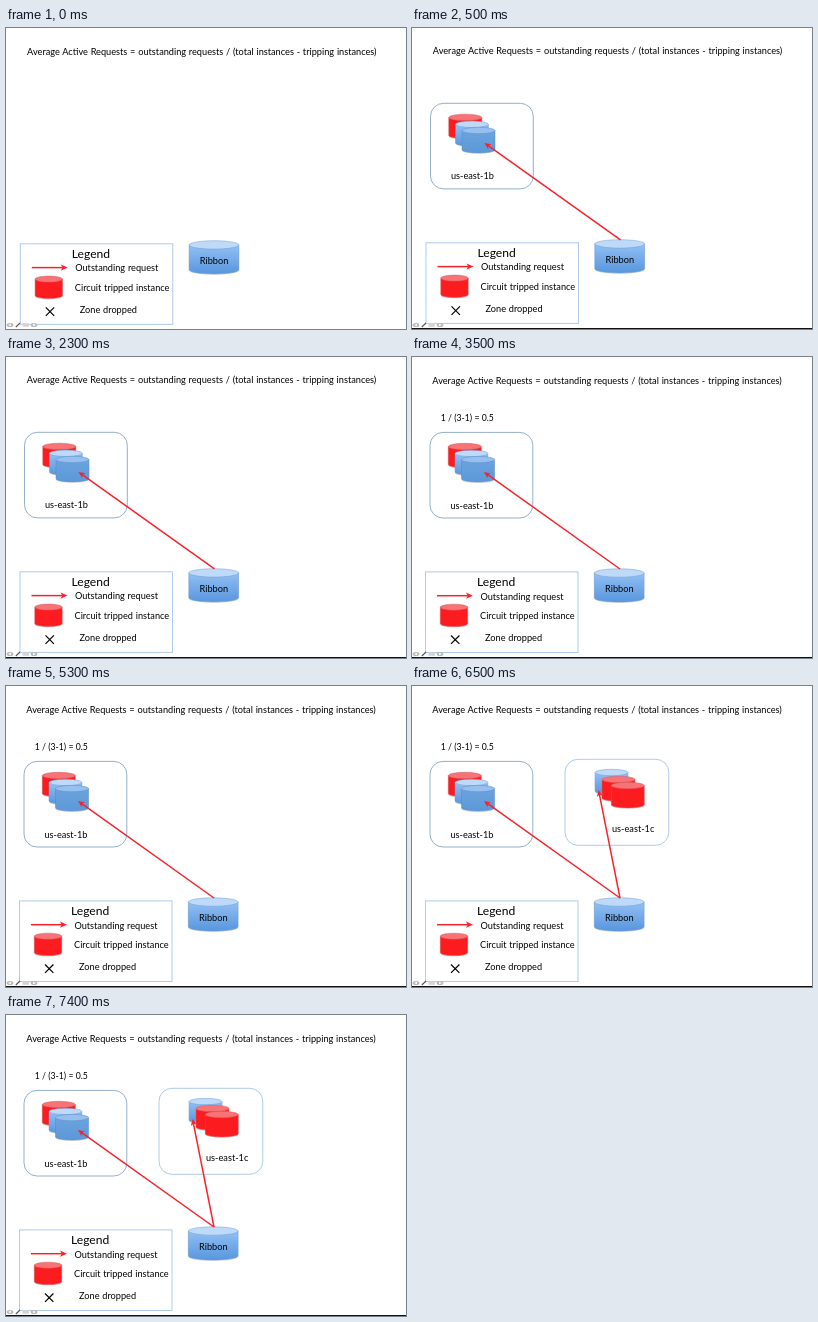
These frames come from a looping animation (400 px wide and 301 px high, 8 s). An HTML page:

```html
<!DOCTYPE html>
<html lang="en">
<head>
<meta charset="utf-8">
<title>Average active requests</title>
<style>
  html, body { margin: 0; width: 100%; height: 100%; overflow: hidden; background: #fff; }
  svg { display: block; width: 400px; height: 301px; }
  text { font-family: Lato, sans-serif; font-size: 9.2px; word-spacing: .43px; fill: #000; }
  .heading { font-size: 12.1px; }
  .sum { font-size: 8.7px; word-spacing: 0; }
  .panel { fill: none; stroke: #aecbe8; }
  .dark { stroke: #94afca; }
  .arrow { stroke: #f9222a; stroke-width: 1.5; fill: none; }
  .head { fill: #f9222a; }
</style>
</head>
<body>
<svg id="stage" viewBox="0 0 400 301">
  <defs>
    <linearGradient id="blue" x2="0" y2="1">
      <stop offset="0" stop-color="#92c0f4"/><stop offset="1" stop-color="#5896de"/>
    </linearGradient>
    <linearGradient id="flat" x2="0" y2="1">
      <stop offset="0" stop-color="#6ba3de"/><stop offset="1" stop-color="#5c98d8"/>
    </linearGradient>
  </defs>
</svg>
<script>
const stage = document.getElementById('stage');
const NS = 'http://www.w3.org/2000/svg';

function add(parent, tag, attrs = {}, text = '') {
  const el = document.createElementNS(NS, tag);
  for (const key in attrs) el.setAttribute(key, attrs[key]);
  el.textContent = text;
  return parent.appendChild(el);
}

const label = (parent, x, y, text, cls = '') => add(parent, 'text', { x, y, class: cls }, text);

const panel = (parent, x, y, width, height, rx = 0, cls = '') =>
  add(parent, 'rect', { x, y, width, height, rx, class: `panel ${cls}` });

const skins = {
  blue: ['url(#blue)', '#bfdaf8', '#6c9dd2'],
  flat: ['url(#flat)', '#97c0ee', '#5a8fca'],
  red: ['#fc1b1f', '#f77376', '#d8585c']
};

function cylinder(parent, x, y, w, h, ry, skin) {
  const [body, lid, stroke] = skins[skin];
  const rx = w / 2;
  const line = { stroke, 'stroke-width': .5 };
  const d = `M${x} ${y + ry}V${y + h - ry}a${rx} ${ry} 0 0 0 ${w} 0V${y + ry}z`;
  add(parent, 'path', { d, fill: '#000', opacity: .16, transform: 'translate(0 .9)' });
  add(parent, 'path', { d, fill: body, ...line });
  add(parent, 'ellipse', { cx: x + rx, cy: y + ry, rx, ry, fill: lid, ...line });
}

function arrow(parent, x1, y1, x2, y2, size = 6.5) {
  const angle = Math.atan2(y2 - y1, x2 - x1);
  const bx = x2 - Math.cos(angle) * size * .7;
  const by = y2 - Math.sin(angle) * size * .7;
  add(parent, 'path', { d: `M${x1} ${y1}L${bx} ${by}`, class: 'arrow' });
  add(parent, 'path', {
    d: `M0 0L${-size} ${-size * .45}L${-size * .75} 0L${-size} ${size * .45}z`, class: 'head',
    transform: `translate(${x2} ${y2}) rotate(${angle * 180 / Math.PI})`
  });
}

const slide = add(stage, 'g');
label(slide, 20.3, 26.6, 'Average Active Requests = outstanding requests / (total instances - tripping instances)');

// Legend
panel(slide, 13.5, 214.9, 152.5, 80.6);
label(slide, 65, 229.4, 'Legend', 'heading');
arrow(slide, 25, 238.7, 61, 238.7, 7);
label(slide, 68.4, 242.6, 'Outstanding request');
cylinder(slide, 28.3, 247.2, 27.4, 22.4, 3, 'red');
label(slide, 68, 262.3, 'Circuit tripped instance');
add(slide, 'path', { d: 'M39 278.5l8.4 8.4m0-8.4l-8.4 8.4', stroke: '#000', 'stroke-width': 1.2 });
label(slide, 73, 284.1, 'Zone dropped');

cylinder(slide, 182.3, 211.8, 49.8, 33.2, 4.2, 'blue');
label(slide, 193, 235, 'Ribbon');

const zoneB = add(slide, 'g');
panel(zoneB, 18, 75.4, 102.8, 85.6, 13, 'dark');
cylinder(zoneB, 36.3, 86.3, 33, 24.4, 3.2, 'red');
cylinder(zoneB, 43, 93.2, 32.8, 25, 3.2, 'blue');
cylinder(zoneB, 49.5, 99.4, 33, 25.6, 3.2, 'flat');
label(zoneB, 38.4, 151.5, 'us-east-1b');
arrow(zoneB, 208, 212, 72, 115);

const load = add(slide, 'g');
label(load, 28.8, 63.5, '1 / (3-1) = 0.5', 'sum');

const zoneC = add(slide, 'g');
panel(zoneC, 153, 73.3, 103.8, 86, 13);
cylinder(zoneC, 183, 83.3, 33, 25, 3.2, 'blue');
cylinder(zoneC, 190, 90.2, 33, 25, 3.2, 'red');
cylinder(zoneC, 199.3, 96.3, 33, 25.6, 3.2, 'red');
label(zoneC, 200, 145.7, 'us-east-1c');
arrow(zoneC, 208, 212, 186.5, 104);

// Slide show controls
const controls = add(stage, 'g', { fill: '#b8b8b8' });
for (const [cx, side] of [[4, -1], [28, 1]]) {
  add(controls, 'ellipse', { cx, cy: 297, rx: 3.4, ry: 2 });
  add(controls, 'path', { d: `M${cx + side * 2} 297l${-side * 3} -1.3v2.6z`, fill: '#fff' });
}
add(controls, 'rect', { x: 16.5, y: 295.2, width: 6.5, height: 3.6, fill: '#d4d4d4' });
add(controls, 'path', { d: 'M9.8 299l4.2-4', stroke: '#555', 'stroke-width': 1.1 });
const edge = add(stage, 'rect', { y: 300, width: 400, height: 1, fill: '#111' });

// Start time, slide offset, number of parts revealed
const steps = [
  [0, .8, .9, 0],
  [500, .5, -.1, 1],
  [3500, 0, 0, 2],
  [6500, 0, 0, 3]
];
const parts = [zoneB, load, zoneC];
const show = (el, on) => el.setAttribute('visibility', on ? 'visible' : 'hidden');

function draw(now) {
  const t = now % 8000;
  const [, dx, dy, count] = steps.filter(step => step[0] <= t).pop();
  slide.setAttribute('transform', `translate(${dx} ${dy})`);
  parts.forEach((part, i) => show(part, i < count));
  show(edge, count > 0);
}

const start = performance.now();
function tick() {
  draw(performance.now() - start);
  requestAnimationFrame(tick);
}
tick();
</script>
</body>
</html>
```
